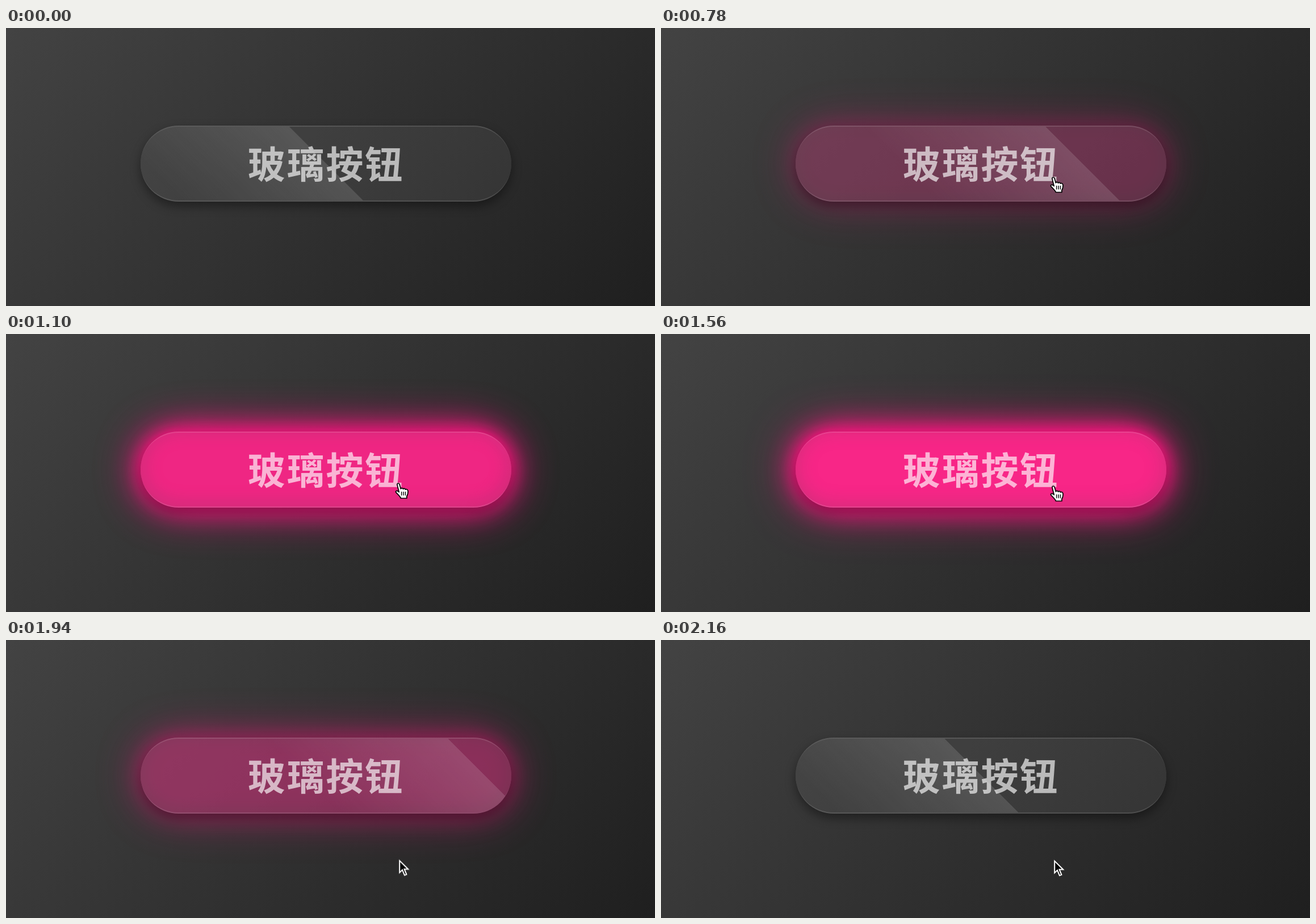
Write an HTML page that moves like this. It is 1143 by 490 pixels and loops after 2300 ms.

```html
<!DOCTYPE html>
<html lang="zh-CN">
<head>
<meta charset="utf-8">
<title>玻璃按钮</title>
<style>
  :root { --loop: 2300ms; --pink: #f81980; }
  html, body { margin: 0; width: 100%; height: 100%; overflow: hidden; }
  body {
    position: relative;
    background: linear-gradient(135deg, #434343, #1f1f1f);
  }
  .glow, .button {
    position: absolute;
    left: 237px;
    top: 172px;
    width: 653px;
    height: 134px;
    box-sizing: border-box;
    border-radius: 67px;
  }
  .glow {
    background: var(--pink);
    box-shadow:
      0 0 8px var(--pink), 0 0 26px var(--pink),
      0 0 50px var(--pink), 0 0 84px var(--pink),
      inset 0 -4px 34px rgba(100, 55, 80, .3);
    animation: glow var(--loop) infinite ease-in-out;
  }
  .button {
    overflow: hidden;
    border: solid rgba(255, 255, 255, .12);
    border-width: 2px 0;
    background: rgba(255, 255, 255, .06);
    box-shadow: 0 8px 18px rgba(0, 0, 0, .4);
    color: rgba(255, 255, 255, .65);
    font: bold 66px/124px "Noto Sans CJK SC", "Noto Sans CJK", sans-serif;
    letter-spacing: 2.7px;
    text-align: center;
    white-space: nowrap;
  }
  .button::before {
    content: "";
    position: absolute;
    left: 0;
    top: 0;
    width: 50%;
    height: 100%;
    background: linear-gradient(to left, rgba(255, 255, 255, .13), transparent);
    animation: sheen var(--loop) infinite ease-in-out;
  }
  .cursor {
    position: absolute;
    left: 0;
    top: 0;
    animation: travel var(--loop) infinite linear;
  }
  .cursor svg { position: absolute; overflow: visible; }
  .arrow { left: 0; top: 0; animation: arrow var(--loop) infinite step-end; }
  .hand { left: -6px; top: -1px; animation: hand var(--loop) infinite step-end; }

  /* The pointer is over the button from 600 ms to 1670 ms. */
  @keyframes glow {
    0%, 26.087% { opacity: 0; }
    47.826% { opacity: .96; }
    56.522%, 72.609% { opacity: 1; }
    94.348%, 100% { opacity: 0; }
  }
  @keyframes sheen {
    0%, 26.087%, 94.348%, 100% { transform: skewX(45deg) translateX(0); }
    47.826%, 72.609% { transform: skewX(45deg) translateX(200%); }
  }
  @keyframes travel {
    0% { transform: translate(848px, 490px); }
    16.2% {
      transform: translate(848px, 490px);
      animation-timing-function: cubic-bezier(.3, .69, .64, 1);
    }
    33.913% { transform: translate(691px, 263px); }
    63.478% {
      transform: translate(691px, 263px);
      animation-timing-function: cubic-bezier(.65, 0, .35, 1);
    }
    86.087%, 100% { transform: translate(692px, 387px); }
  }
  @keyframes arrow {
    0%, 72.609% { visibility: visible; }
    26.087% { visibility: hidden; }
  }
  @keyframes hand {
    0%, 72.609% { visibility: hidden; }
    26.087% { visibility: visible; }
  }
</style>
</head>
<body>
  <div class="glow"></div>
  <div class="button">玻璃按钮</div>
  <div class="cursor">
    <svg class="arrow" width="20" height="32">
      <path d="M1.2 2.6V23.4L6 18.8L10 28.2L13.4 26.8L9.5 17.5H16.2Z" fill="#000" stroke="#fff" stroke-width="2"/>
    </svg>
    <svg class="hand" width="26" height="31" stroke="#000" stroke-linecap="round" stroke-linejoin="round">
      <path d="M4 4C3.2 1 7 .2 8 3L10.3 11C10.8 9 14 9.2 14.4 11.3C15.2 9.7 18 10.2 18.3 12.2C19.4 11 22.4 11.6 22.8 14.2C23.3 18 23 20.5 20.8 24V27.5H10.3C9.7 24.7 4.5 20 1.8 17.2C.4 15 3.2 13.4 5.2 15L7.2 16.6Z" fill="#fff" stroke-width="1.7"/>
      <path d="M11.6 16.5V22M15 16.5V22M18.4 16.5V22" fill="none" stroke-width="1.4"/>
    </svg>
  </div>
</body>
</html>
```
